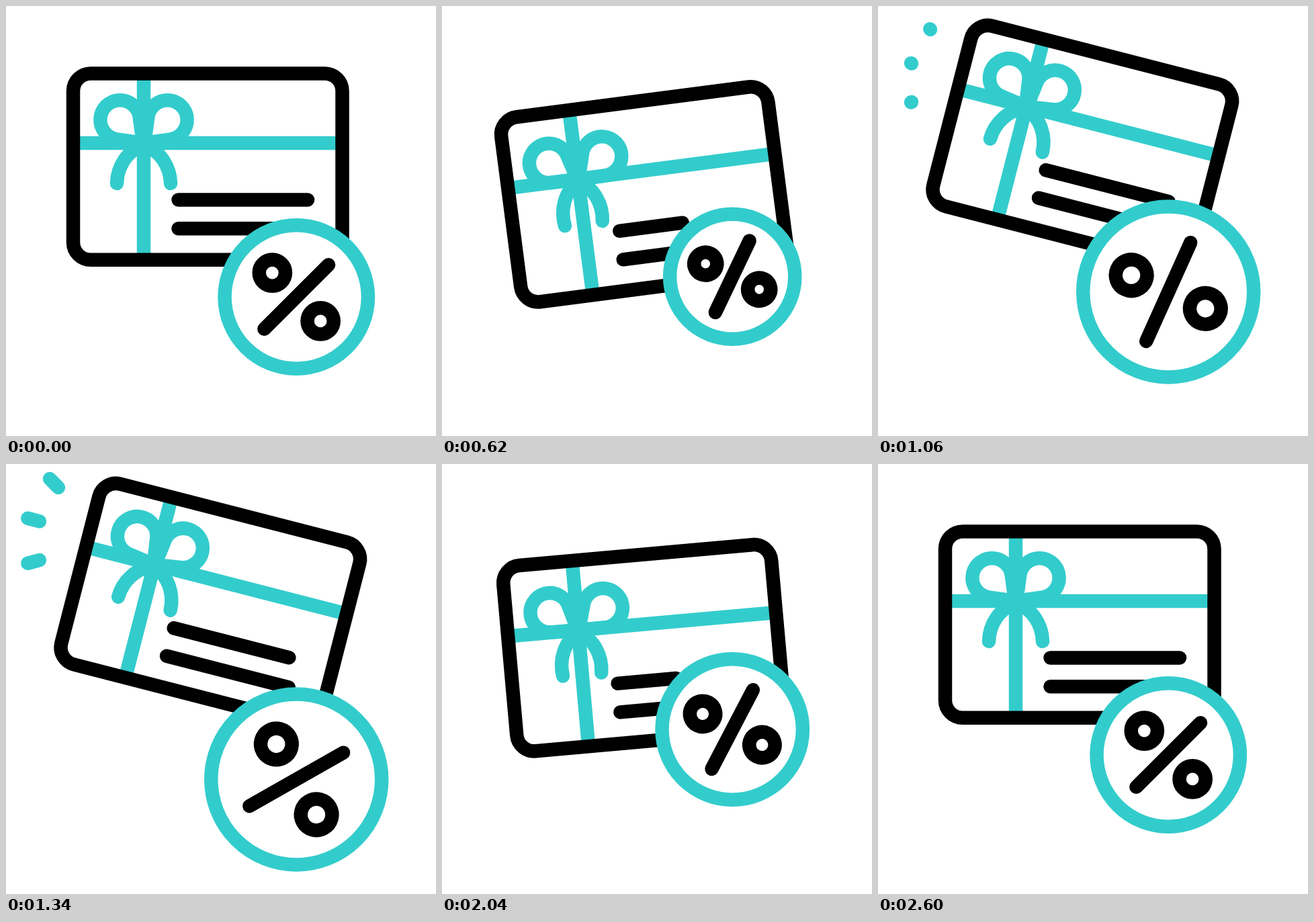
An HTML page with a canvas for the animation above (3 s loop, 640 by 640 pixels).

```html
<!DOCTYPE html>
<html lang="en">
<head>
<meta charset="utf-8">
<title>Gift card discount</title>
<style>
  html, body { margin: 0; width: 100%; height: 100%; overflow: hidden; background: #fff; }
  canvas { display: block; width: 100%; height: 100%; }
</style>
</head>
<body>
<canvas id="stage" width="640" height="640"></canvas>
<script>
const ctx = document.getElementById('stage').getContext('2d');
const LOOP = 3000, TEAL = '#33cccc', BLACK = '#000', RAD = Math.PI / 180;

// Smooth 0 to 1 ramp
function ease(t, start, duration) {
  const u = Math.min(1, Math.max(0, (t - start) / duration));
  return u * u * (3 - 2 * u);
}

// Smooth 0 to 1 to 0 hump
const hump = (t, peak, reach) => ease(reach - Math.abs(t - peak), 0, reach);

const cardDrop = t => 25 * (hump(t, 600, 400) + hump(t, 1980, 380));
const cardAngle = t => 9.8 * (ease(t, 1880, 330) - ease(t, 200, 325))
  + 24.2 * (ease(t, 525, 490) - ease(t, 1540, 340));
const bowFlutter = t => ease(t, 200, 400) - 1.2 * ease(t, 600, 250) + .2 * ease(t, 850, 250)
  + hump(t, 1980, 380);
const lineLength = t => 192.5 * (1 - .55 * (ease(t, 200, 505) - ease(t, 705, 400)
  + ease(t, 1125, 905) - ease(t, 2030, 330)));
const badgeDrop = t => 38.5 * (hump(t, 1400, 600) - hump(t, 800, 600) - hump(t, 2000, 600));
const badgeScale = t => 1 - .13 * (hump(t, 600, 400) + hump(t, 2200, 400))
  + .19 * (ease(t, 600, 400) - ease(t, 1800, 400));
const percentAngle = t => 30 * (ease(t, 2200, 400) - ease(t, 200, 700))
  + 60 * (ease(t, 900, 650) - ease(t, 1660, 540));

function stroke(path, color, cap = 'round') {
  ctx.strokeStyle = color;
  ctx.lineCap = cap;
  ctx.stroke(path);
}

function line(x1, y1, x2, y2, color, cap) {
  const path = new Path2D();
  path.moveTo(x1, y1);
  path.lineTo(x2, y2);
  stroke(path, color, cap);
}

function ring(x, y, r, color) {
  const path = new Path2D();
  path.arc(x, y, r, 0, 7);
  stroke(path, color);
}

function group(draw) {
  ctx.save();
  draw();
  ctx.restore();
}

const frame = new Path2D();
frame.roundRect(100, 100.5, 400.5, 277.3, 26);
// Left half of the bow, relative to the knot
const bowLoop = new Path2D('M-1 0L-40.5 -5.7A29.3 29.3 0 1 1 -6.5 -40Z');
const bowTail = new Path2D('M-1 4C-25 11 -39.5 36 -40 60');

function drawBowPart(path, side, angle) {
  group(() => {
    ctx.translate(205, 204);
    ctx.scale(side, 1);
    ctx.rotate(-angle * RAD);
    stroke(path, TEAL);
  });
}

function drawCard(t) {
  // The card swings around a point near its right side
  ctx.translate(428, 239.2 + cardDrop(t));
  ctx.rotate(cardAngle(t) * RAD);
  ctx.translate(-428, -239.2);

  line(205, 105, 205, 373, TEAL, 'butt');
  line(105, 204, 495, 204, TEAL, 'butt');
  for (const side of [1, -1]) {
    drawBowPart(bowLoop, side, 8.2 * bowFlutter(t));
    drawBowPart(bowTail, side, 11 * bowFlutter(t));
  }
  stroke(frame, BLACK);
  line(256.5, 288.4, 256.5 + lineLength(t), 288.4, BLACK);
  line(256.5, 331.3, 256.5 + lineLength(t - 100), 331.3, BLACK);
}

function drawBadge(t) {
  const s = badgeScale(t), arm = 47.8 * s, dot = 35.9 * s;
  ctx.translate(432.2, 433 + badgeDrop(t));
  ctx.fillStyle = '#fff';
  ctx.beginPath();
  ctx.arc(0, 0, 106.7 * s, 0, 7);
  ctx.fill();
  ring(0, 0, 106.7 * s, TEAL);
  ctx.rotate(percentAngle(t) * RAD);
  line(-arm, arm, arm, -arm, BLACK);
  ring(-dot, -dot, 19.6 * s, BLACK);
  ring(dot, dot, 19.6 * s, BLACK);
}

function drawSpark(t, x, y, angle) {
  const head = 24 * ease(t, 1000, 500), tail = 24 * ease(t, 1330, 270);
  if (head <= tail) return;
  group(() => {
    ctx.translate(x, y);
    ctx.rotate(angle * RAD);
    line(-tail, 0, -head, 0, TEAL);
  });
}

function render(now) {
  const t = now % LOOP;
  ctx.clearRect(0, 0, 640, 640);
  ctx.lineWidth = 20.5;
  ctx.lineJoin = 'round';
  drawSpark(t, 78, 35, 45);
  drawSpark(t, 50, 85.5, 15);
  drawSpark(t, 50, 143, -15);
  group(() => drawCard(t));
  group(() => drawBadge(t));
}

const start = performance.now();
(function tick() {
  render(performance.now() - start);
  requestAnimationFrame(tick);
})();
</script>
</body>
</html>
```
